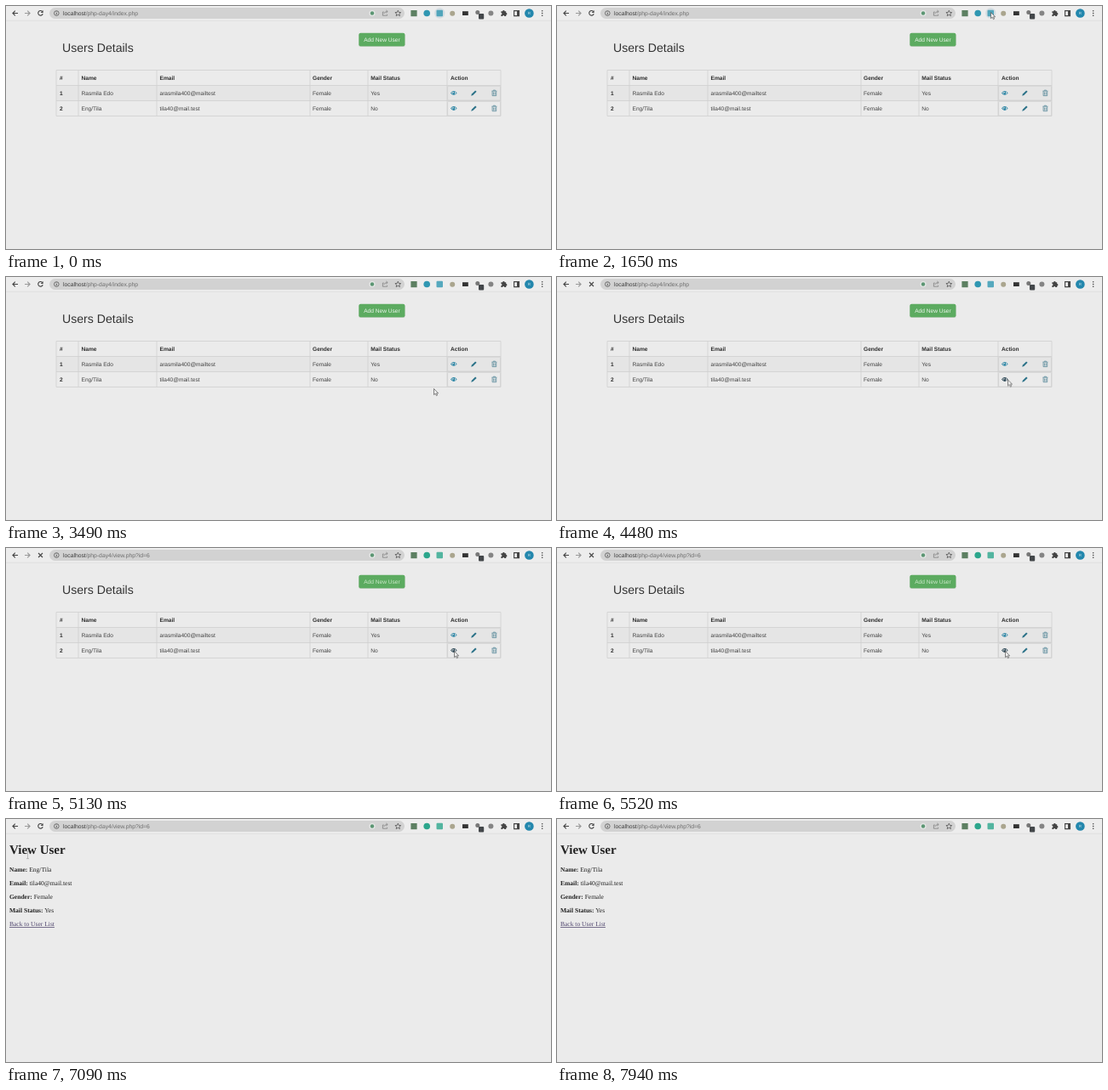
Animation, 640 px wide and 286 px high, one loop 8000 ms. Source, as an HTML page:

```html
<!DOCTYPE html>
<html lang="en">
<head>
<meta charset="utf-8">
<title>Users Details</title>
<style>
  html, body { margin: 0; width: 100%; height: 100%; overflow: hidden; background: #ebebeb; }
  svg { display: block; width: 100vw; height: 100vh; }
  text { font: 6.6px "Liberation Sans", Arial, sans-serif; fill: #444; text-rendering: geometricPrecision; white-space: pre; }
  .bold { font-weight: 700; fill: #2e2e2e; }
  .heading { font-size: 14.1px; fill: #333; }
  .url text { font-size: 6.77px; fill: #6c6c6c; }
  .url .host { fill: #3c3c3c; }
  .view text { font: 7.54px "Liberation Serif", Times, serif; fill: #222; }
  .view .title { font-size: 15px; font-weight: 700; }
  .view tspan { font-weight: 700; }
  .view .link { fill: #50466e; text-decoration: underline; }
  .line { fill: none; stroke: #444; stroke-width: 1.1; }
  .grid { fill: none; stroke: #d0d0d0; stroke-width: .8; }

  .list, .view, .index, .query, .reload, .stop, .hover, .eye-hover, .label, .tint, .arrow, .beam {
    animation: 8s step-end infinite;
  }
  .list { animation-name: until-view; }
  .view { animation-name: from-view; }
  .index { animation-name: until-url; }
  .query { animation-name: from-url; }
  .stop { animation-name: loading; }
  .reload { animation-name: idle; }
  .hover { animation-name: extension-hover; }
  .eye-hover { animation-name: eye-hover; }
  .label { animation-name: label; }
  .tint { animation-name: tint; }
  .arrow { animation-name: arrow; }
  .beam { animation-name: beam; }

  @keyframes until-view { 0% { opacity: 1 } 80.5%, 100% { opacity: 0 } }
  @keyframes from-view { 0% { opacity: 0 } 80.5%, 100% { opacity: 1 } }
  @keyframes until-url { 0% { opacity: 1 } 59.25%, 100% { opacity: 0 } }
  @keyframes from-url { 0% { opacity: 0 } 59.25%, 100% { opacity: 1 } }
  @keyframes loading { 0% { opacity: 0 } 56% { opacity: 1 } 80.5%, 100% { opacity: 0 } }
  @keyframes idle { 0% { opacity: 1 } 56% { opacity: 0 } 80.5%, 100% { opacity: 1 } }
  @keyframes extension-hover { 0% { opacity: 1 } 24.75%, 100% { opacity: 0 } }
  @keyframes eye-hover { 0% { color: #2683a3 } 48.625%, 100% { color: #294453 } }
  @keyframes label { 0% { fill: #eef6ee } 64.125%, 100% { fill: #cdeacb } }
  @keyframes tint { 0% { fill: #3097b2 } 64.125%, 100% { fill: #2ca68c } }
  @keyframes arrow {
    0% { opacity: 0; transform: translate(509px, 7px) }
    14.875% { opacity: 1; transform: translate(509px, 7px) }
    24.75% { transform: translate(466px, 17px) }
    27.25% { transform: translate(461px, 34px) }
    30.5% { transform: translate(444px, 150px) }
    33% { transform: translate(480px, 158px) }
    34.625% { transform: translate(519px, 139px) }
    37.875% { transform: translate(508px, 132px) }
    39.5% { transform: translate(495px, 129px) }
    43.625% { transform: translate(502px, 131px) }
    46.125% { transform: translate(520px, 124px) }
    48.625% { transform: translate(529px, 120.5px) }
    64.125% { transform: translate(526px, 121px) }
    83.75% { transform: translate(300px, 85px) }
    85.375% { opacity: 1; transform: translate(61px, 47px) }
    88.625%, 100% { opacity: 0; transform: translate(61px, 47px) }
  }
  @keyframes beam {
    0% { opacity: 0; transform: translate(24px, 38px) }
    88.625% { opacity: .6; transform: translate(24px, 38px) }
    90.25% { transform: translate(27px, 47px) }
    92.75% { transform: translate(33px, 57px) }
    96% { transform: translate(44px, 66px) }
    97.625% { opacity: .6; transform: translate(53px, 71px) }
    99.25%, 100% { opacity: 0; transform: translate(53px, 71px) }
  }
</style>
</head>
<body>
<svg viewBox="0 0 640 286" preserveAspectRatio="none">
  <defs>
    <g id="eye">
      <path d="M-3.8 0Q0-4.8 3.8 0Q0 4.8-3.8 0Z" fill="currentColor"/>
      <path d="M-2.8 0Q-2-1.4-1-1.8Q-1.9 0-1 1.7Q-2-.1-2.8 0ZM2.8 0Q2-1.4 1-1.8Q1.9 0 1 1.7Q2 1.4 2.8 0Z" fill="#e6e6e6"/>
      <circle cx="-.4" cy="-.7" r=".6" fill="#e6e6e6"/>
    </g>
    <path id="pencil" d="M-3.3 3.3L-2.6 1.2L1.6-3L3.1-1.6L-1.1 2.6Z" fill="#2b7288"/>
    <g id="trash" fill="none" stroke="#58899a" stroke-width=".8">
      <path d="M-3-2.3H3M-1.1-2.5V-3.3H1.1V-2.5M-2.3-2.1V3.2H2.3V-2.1M-.8-1V2.2M.8-1V2.2"/>
    </g>
    <g id="actions">
      <rect x="518.6" y="-8.2" width="62" height="16.8" rx="1" class="grid"/>
      <use href="#pencil" x="549.5"/>
      <use href="#trash" x="573.4"/>
    </g>
  </defs>

  <rect width="640" height="286" fill="#ebebeb"/>

  <g class="list">
    <text class="heading" x="66" y="53.8">Users Details</text>
    <rect x="414.2" y="32.2" width="54.4" height="15.8" rx="2" fill="#bcccbc"/>
    <rect x="414.4" y="31.7" width="54" height="15.6" rx="2" fill="#5cab60"/>
    <text class="label" x="420.2" y="41.9">Add New User</text>

    <rect x="59" y="93.5" width="522" height="18" fill="#e5e5e5"/>
    <path class="grid" d="M59 75.5H581V129.5H59ZM59 93.5H581M59 111.5H581M85 75.5V129.5M177 75.5V129.5M357 75.5V129.5M425 75.5V129.5M518 75.5V129.5"/>
    <g class="bold">
      <text class="bold" x="63" y="87">#</text>
      <text class="bold" x="88.5" y="87">Name</text>
      <text class="bold" x="180.5" y="87">Email</text>
      <text class="bold" x="360" y="87">Gender</text>
      <text class="bold" x="428.2" y="87">Mail Status</text>
      <text class="bold" x="522" y="87">Action</text>
    </g>
    <text class="bold" x="63" y="104.8">1</text>
    <text x="88.5" y="104.8">Rasmila Edo</text>
    <text x="180.5" y="104.8">arasmila400@mailtest</text>
    <text x="360" y="104.8">Female</text>
    <text x="428.2" y="104.8">Yes</text>
    <text class="bold" x="63" y="123">2</text>
    <text x="88.5" y="123">Eng/Tila</text>
    <text x="180.5" y="123">tila40@mail.test</text>
    <text x="360" y="123">Female</text>
    <text x="428.2" y="123">No</text>
    <use href="#actions" y="102.4"/>
    <use href="#actions" y="120.5"/>
    <use href="#eye" x="525.8" y="102.4" color="#2683a3"/>
    <use class="eye-hover" href="#eye" x="525.8" y="120.5"/>
  </g>

  <g class="view">
    <text class="title" x="4" y="41.3">View User</text>
    <text x="4" y="61.8"><tspan>Name:</tspan> Eng/Tila</text>
    <text x="4" y="77.9"><tspan>Email:</tspan> tila40@mail.test</text>
    <text x="4" y="93.9"><tspan>Gender:</tspan> Female</text>
    <text x="4" y="110"><tspan>Mail Status:</tspan> Yes</text>
    <text class="link" x="4" y="126">Back to User List</text>
  </g>

  <!-- Browser toolbar -->
  <rect width="640" height="17" fill="#ededed"/>
  <path d="M0 17.2H640" stroke="#dadada" stroke-width=".7"/>
  <path class="line" d="M14 8.5H8M10.8 5.6L7.9 8.5L10.8 11.4"/>
  <path class="line" d="M22 8.5H28M25.2 5.6L28.1 8.5L25.2 11.4" style="stroke:#999"/>
  <g class="reload">
    <path class="line" d="M42.6 6.4A2.8 2.8 0 1 0 43.2 9.2"/>
    <path d="M43.6 5V8H40.6Z" fill="#444"/>
  </g>
  <path class="line stop" d="M38 6L43 11M43 6L38 11"/>
  <rect x="51" y="2" width="417" height="13" rx="6.5" fill="#d2d2d2"/>
  <circle class="line" cx="59.3" cy="8.5" r="2.8" style="stroke-width:.7"/>
  <path class="line" d="M59.3 8V10.2M59.3 6.6V7.3" style="stroke-width:.8"/>
  <g class="url">
    <text class="index" x="67" y="10.9"><tspan class="host">localhost</tspan>/php-day4/index.php</text>
    <text class="query" x="67" y="10.9"><tspan class="host">localhost</tspan>/php-day4/view.php?id=6</text>
  </g>
  <circle cx="430" cy="8.5" r="3.6" fill="#e4e7e5"/>
  <circle cx="430" cy="8.5" r="2.2" fill="#5c9673"/>
  <path class="line" d="M443.8 7H442.4V11.2H447.6V9.8M443.8 9Q444.5 6.6 447.7 6.5M446.4 5L448.2 6.5L446.4 8" style="stroke:#777;stroke-width:.7"/>
  <path class="line" d="M460.3 5.2L461.3 7.4L463.7 7.6L461.9 9.2L462.4 11.6L460.3 10.3L458.2 11.6L458.7 9.2L456.9 7.6L459.3 7.4Z" style="stroke-width:.7"/>

  <rect x="475.4" y="5" width="7.2" height="7.2" fill="#5d8062"/>
  <circle class="tint" cx="494.2" cy="8.5" r="3.8"/>
  <circle class="hover" cx="509.3" cy="8.5" r="6.2" fill="#d4dde2"/>
  <rect class="tint" x="505.5" y="4.8" width="7.5" height="7.5" rx="1" fill-opacity=".8"/>
  <circle cx="524.2" cy="8.8" r="3" fill="#aaa58e"/>
  <rect x="536" y="6.2" width="6.8" height="4.8" fill="#333"/>
  <circle cx="553.8" cy="7.6" r="2.5" fill="#777"/>
  <rect x="555" y="9" width="6.2" height="6.4" rx="1" fill="#43474a"/>
  <circle cx="569.4" cy="8.5" r="3" fill="#858585"/>
  <path d="M581.4 6.3H583.2A1.2 1.2 0 1 1 585.6 6.3H587.2V8A1.2 1.2 0 1 1 587.2 10.4V12H585.3A1.1 1.1 0 0 0 583.1 12H581.4V10.2A1.1 1.1 0 0 0 581.4 8Z" fill="#444"/>
  <path class="line" d="M596.6 5.6H602.5V11.6H596.6Z"/>
  <path d="M600 5.6H603V11.6H600Z" fill="#444"/>
  <circle cx="614.4" cy="8.5" r="5.3" fill="#2387ad"/>
  <text x="614.4" y="10.1" text-anchor="middle" style="font-size:4.5px;fill:#d7e9ef">R</text>
  <g fill="#444">
    <circle cx="629.7" cy="5.8" r=".8"/>
    <circle cx="629.7" cy="8.5" r=".8"/>
    <circle cx="629.7" cy="11.2" r=".8"/>
  </g>

  <path class="arrow" d="M.5.5V7.6L2.2 6.2L3.5 8.7L4.6 8.1L3.5 5.8H5.6Z" fill="#f0f0f0" stroke="#555" stroke-width=".7"/>
  <path class="beam" d="M0 .4H3M1.5.4V8.6M0 8.6H3" fill="none" stroke="#777" stroke-width=".7"/>
</svg>
</body>
</html>
```
